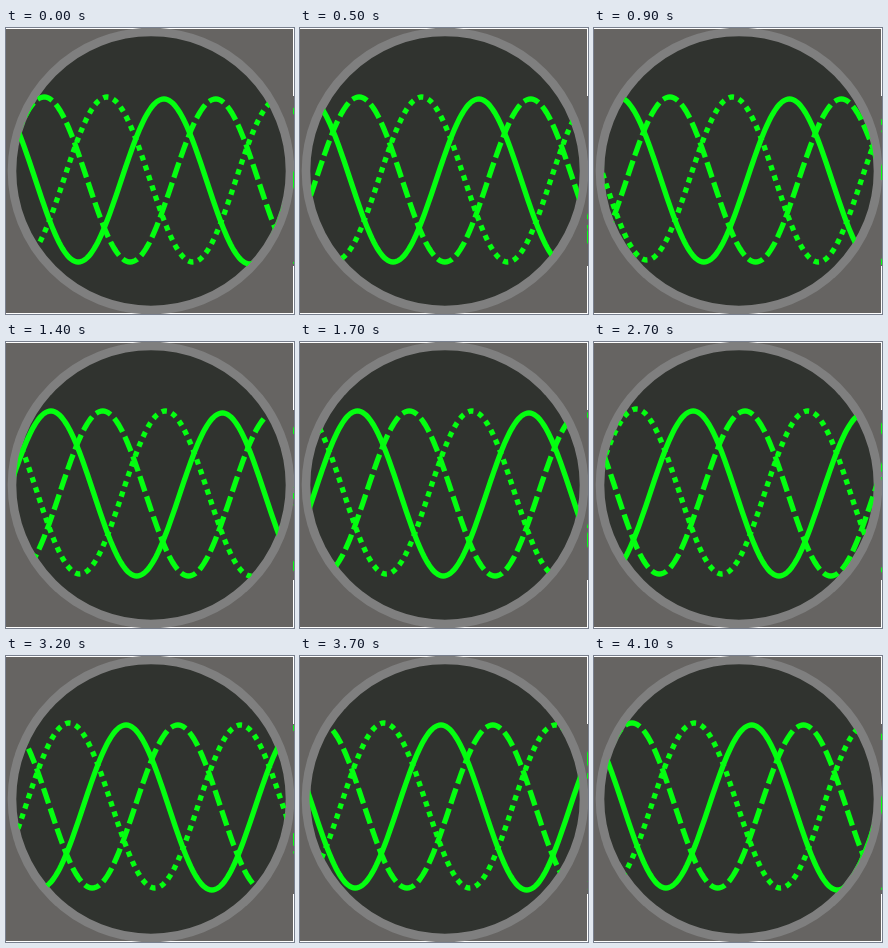
An HTML page that plays this animation: 288 by 286 pixels, repeating every 4200 ms.

```html
<!DOCTYPE html>
<html lang="en">
<head>
<meta charset="utf-8">
<title>Three waves on a round scope</title>
<style>
html, body { margin: 0; width: 100%; height: 100%; overflow: hidden; background: #fff; }
svg { display: block; }
.wave { fill: none; stroke: #04ff10; }
</style>
</head>
<body>
<svg width="288" height="286" viewBox="0 0 288 286">
  <defs>
    <clipPath id="scope">
      <circle cx="145" cy="143" r="135.5"/>
      <rect x="287" y="0" width="1" height="286"/>
    </clipPath>
  </defs>
  <path d="M0 1h287v67h1v170h-1v47h-287z" fill="#666462"/>
  <circle cx="145" cy="143" r="139" fill="#30332f" stroke="#7f7f7f" stroke-width="8.6"/>
  <g clip-path="url(#scope)"><g id="waves"></g></g>
</svg>
<script>
const LOOP = 4200, STEP = 100;
const PERIOD = 171.5, AMP = 82, MID = 151, TILT = 2 / PERIOD;
const SPEED = 4.175;   // pixels per step
const WIDTH = 5.29, CYCLES = 5;
const ARC = 72 * WIDTH;   // curve length of one period
const group = document.getElementById('waves');

// Starts in a trough; peak is the x of one crest at time zero.
function wavePath(peak) {
  const start = -2.5 * PERIOD, count = CYCLES * 98, points = [];
  for (let i = 0; i <= count; i++) {
    const x = start + i * PERIOD / 98;
    const y = MID + x * TILT - AMP * Math.cos(2 * Math.PI * x / PERIOD);
    points.push((peak + x).toFixed(2) + ' ' + y.toFixed(2));
  }
  return 'M' + points.join('L');
}

function addWave(peak, dash, offset) {
  const path = document.createElementNS('http://www.w3.org/2000/svg', 'path');
  path.setAttribute('class', 'wave');
  path.setAttribute('stroke-width', WIDTH);
  path.setAttribute('d', wavePath(peak));
  if (dash) {
    path.setAttribute('pathLength', CYCLES * ARC);
    path.setAttribute('stroke-dasharray', `${dash} ${WIDTH}`);
    path.setAttribute('stroke-dashoffset', offset);
  }
  group.appendChild(path);
}

addWave(-13.5);
addWave(38.3, 3 * WIDTH, 1.5 * WIDTH);
addWave(101, WIDTH, WIDTH / 2 + 2);

function draw(time) {
  const step = Math.floor((time % LOOP) / STEP);
  group.setAttribute('transform', `translate(${(step * SPEED).toFixed(3)} 0)`);
}

function tick() {
  draw(performance.now() - begin);
  requestAnimationFrame(tick);
}

const begin = performance.now();
tick();
</script>
</body>
</html>
```
